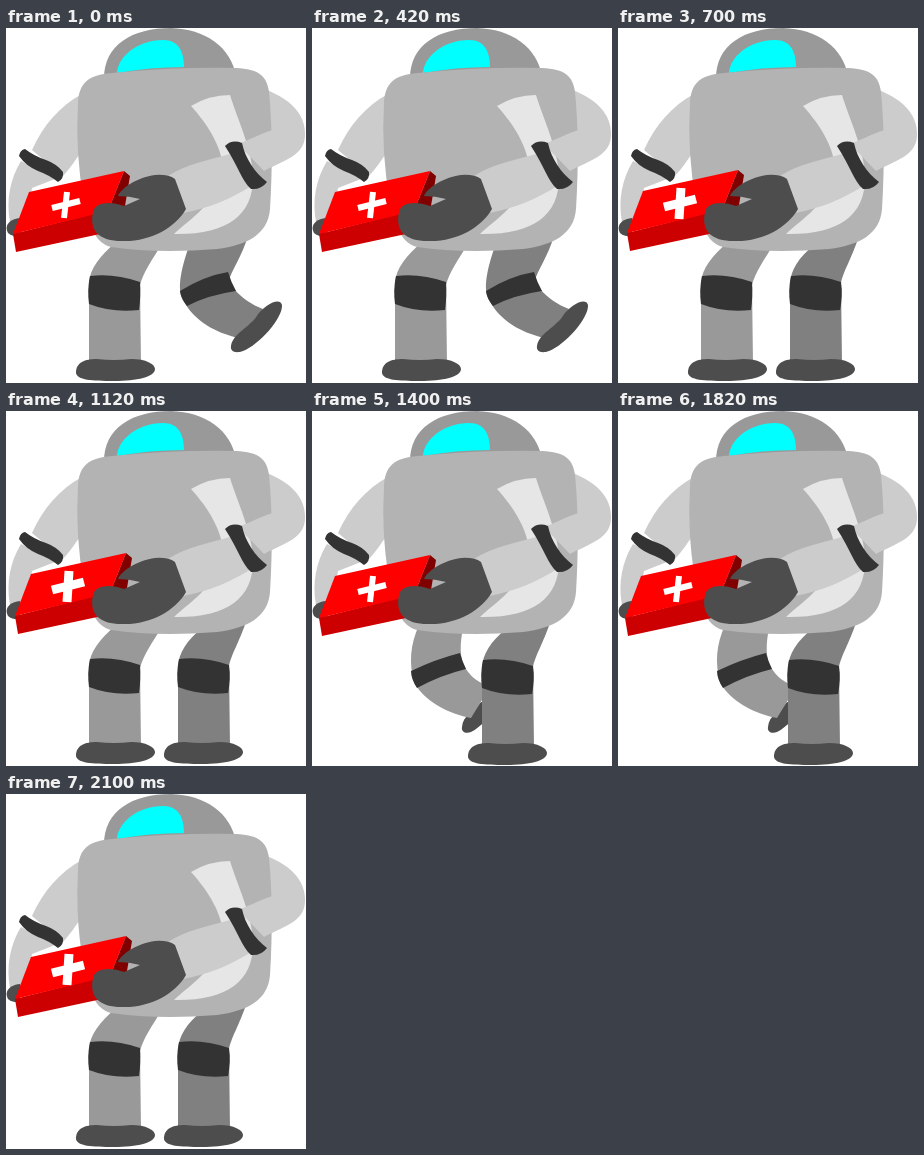
Animation, 300 px wide and 355 px high, one loop 2.8 s. Source, as an HTML page:

```html
<!DOCTYPE html>
<html lang="en">
<head>
<meta charset="utf-8">
<title>Walking medic robot</title>
<style>
html, body { margin: 0; width: 100%; height: 100%; overflow: hidden; background: #fff; }
svg { display: block; width: 100vw; height: 100vh; }
.pose { opacity: 0; }
.limb { fill: #999; }
.far { fill: #808080; }
.arm { fill: #ccc; }
.band { fill: #333; }
.dark { fill: #4d4d4d; }
.cross { fill: none; stroke: #fff; }
</style>
</head>
<body>
<svg viewBox="0 0 300 355">
  <defs>
    <path id="foot" class="dark" d="M70 345C70 334 79 331 91 331Q108 333 125 331C140 331 149 336 149 341C149 349 131 353 108 353C86 353 71 352 70 345Z"/>
    <g id="leftStand">
      <path class="limb" d="M110 214C94 228 84 240 83 255V336H135L134 257C137 245 146 232 157 214Z"/>
      <path class="band" d="M84 248Q108 245 134 254Q135 267 133 282Q106 285 83 276Q81 262 84 248Z"/>
      <use href="#foot"/>
    </g>
    <g id="rightStand">
      <path class="far" d="M197 216C180 230 173 242 172 255V336H224L223 255C225 244 233 232 241 208Z"/>
      <path class="band" d="M173 248Q197 245 223 254Q225 267 222 282Q195 285 172 276Q170 262 173 248Z"/>
      <use href="#foot" x="88"/>
    </g>
  </defs>

  <g class="pose" data-pose="lift-right">
    <use href="#leftStand"/>
    <path class="far" d="M184 215C176 238 171 258 176 270L180 277C192 296 214 306 233 310L257 281C246 277 236 270 229 262L223 252C225 244 236 228 242 208Z"/>
    <path class="band" d="M174 263Q198 248 222 244Q225 254 230 263Q202 267 181 278Q175 271 174 263Z"/>
    <path class="dark" d="M225 318C227 306 241 301 250 289C259 276 274 269 276 277C277 290 253 317 237 323C229 326 224 323 225 318Z"/>
  </g>
  <g class="pose" data-pose="stand">
    <use href="#leftStand"/>
    <use href="#rightStand"/>
  </g>
  <g class="pose" data-pose="lift-left">
    <path class="dark" d="M150 316C151 304 161 302 169 291L182 294C178 306 169 316 159 321C154 323 149 321 150 316Z"/>
    <path class="limb" d="M107 214C98 234 97 252 102 271L105 276C116 292 138 303 159 307L178 276C166 271 159 266 154 258C147 247 148 233 151 217Z"/>
    <path class="band" d="M99 260Q124 248 148 242Q150 250 154 258Q129 264 105 277Q99 268 99 260Z"/>
    <use href="#rightStand" x="-2" y="1"/>
  </g>

  <path class="limb" d="M98 50C98 17 126 0 165 0C199 1 225 19 230 48Z"/>
  <path fill="#0ff" d="M111 45C112 29 131 12 157 12C172 12 178 23 178 39Q143 39 111 45Z"/>
  <path class="arm" d="M76 66C54 78 37 97 26 122L57 148Q67 137 76 122Z"/>
  <path class="arm" d="M15 133C4 151 0 172 4 194H20L26 160L49 151Z"/>
  <path class="band" d="M13 128Q14 122 19 121Q28 128 40 132Q51 136 57 144Q58 151 52 154Q43 147 32 143Q20 138 13 128Z"/>
  <path class="dark" d="M14 190C3 191-2 198 2 205Q7 209 14 208Z"/>

  <path class="arm" d="M255 60C283 69 300 86 299 107C299 127 279 132 258 143L240 113Z"/>
  <path fill="#b3b3b3" d="M72 75C73 55 82 47 106 45Q165 39 230 40C253 41 261 48 263 64Q268 115 264 181C262 206 242 217 211 221Q152 226 105 219C87 214 83 194 78 174Q69 125 72 75Z"/>
  <path fill="#e6e6e6" d="M185 78Q203 67 224 67C231 90 247 123 247 150C247 188 220 207 168 206C180 194 203 181 218 150C218 120 202 97 185 78Z"/>

  <path class="arm" d="M232 116C248 110 258 104 267 102L280 131L258 143Z"/>
  <path class="arm" d="M162 148C181 136 203 132 224 126L247 157C225 171 203 180 177 185Z"/>

  <g id="kit">
    <path fill="#800000" d="M120 142L126 147L121 177L96 205L104 182Z"/>
    <path fill="#c00" d="M9 205L104 181L96 205L12 223Z"/>
    <path fill="red" d="M25 163L120 142L104 182L9 205Z"/>
    <path class="pose cross" data-pose="lift-right lift-left" stroke-width="6" d="M48 179L76 172M63 163L60 189"/>
    <path class="pose cross" data-pose="stand" stroke-width="9" d="M46 179L78 171M63 160L61 191"/>
  </g>

  <path class="dark" d="M87 184C89 174 104 173 118 178L134 171Q123 168 112 168C115 160 132 149 149 147Q162 146 169 151L180 181C169 200 144 214 116 213C93 213 83 203 87 184Z"/>
  <path class="band" d="M219 118Q226 111 236 115C239 130 249 145 261 154Q255 162 245 161C236 153 232 138 219 118Z"/>
</svg>
<script>
const STEP = 700;
const CYCLE = ["lift-right", "stand", "lift-left", "stand"];
const KIT_SHIFT = {
  "lift-right": "translate(-2 1)",
  "stand": "translate(0 0)",
  "lift-left": "translate(-2 2)"
};
const parts = document.querySelectorAll(".pose");
const kit = document.getElementById("kit");
const start = performance.now();

function draw(now) {
  const step = Math.floor(Math.max(0, now - start) / STEP) % CYCLE.length;
  const pose = CYCLE[step];
  for (const part of parts) {
    part.style.opacity = part.dataset.pose.split(" ").includes(pose) ? 1 : 0;
  }
  kit.setAttribute("transform", KIT_SHIFT[pose]);
  requestAnimationFrame(draw);
}
draw(start);
</script>
</body>
</html>
```
